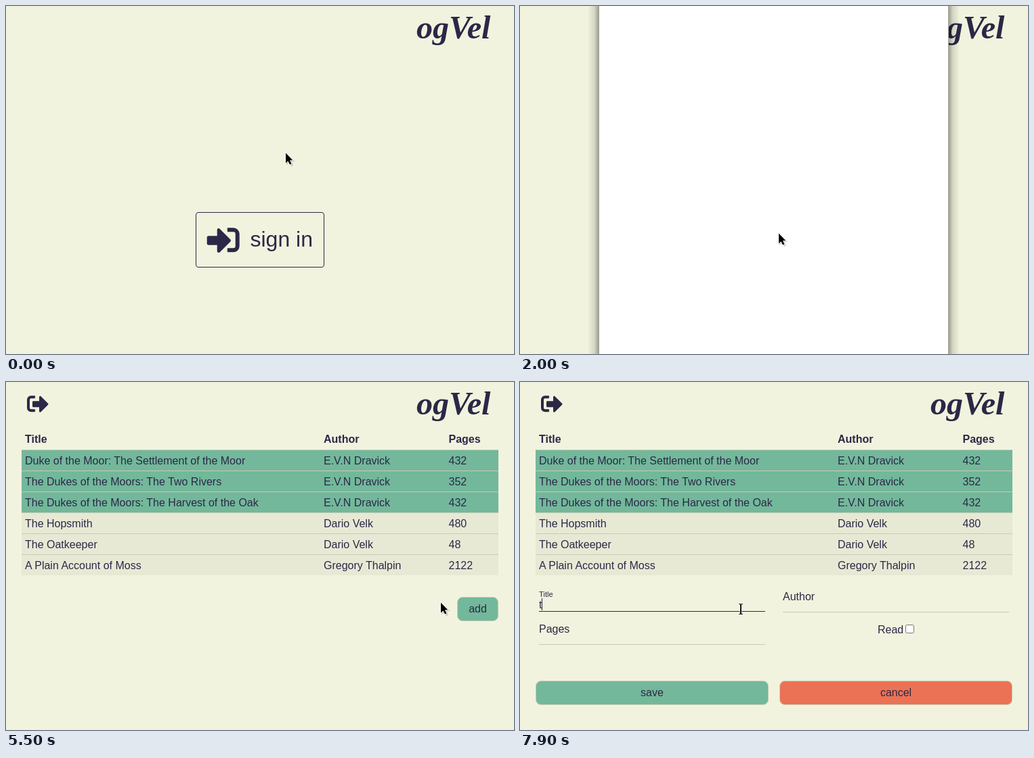
An HTML page for the animation above (8 s loop, 750 by 515 pixels).

```html
<!DOCTYPE html>
<html lang="en">
<head>
<meta charset="utf-8">
<title>Book list</title>
<style>
  html, body { margin: 0; width: 100%; height: 100%; overflow: hidden; background: #f2f3de; }
  svg { display: block; width: 750px; height: 515px; }
  text { font: 16px "Liberation Sans", Arial, sans-serif; fill: #2b2847; white-space: pre; }
  .head { font-weight: bold; }
  .brand { font: italic bold 48px "Liberation Serif", serif; }
  .mid { text-anchor: middle; }
</style>
</head>
<body>
<svg id="stage" viewBox="0 0 750 515">
  <defs>
    <linearGradient id="shade">
      <stop offset="0" stop-opacity="0"/>
      <stop offset=".6" stop-opacity=".13"/>
      <stop offset="1" stop-opacity=".38"/>
    </linearGradient>
    <path id="arrowIcon" fill="#2b2847" d="M369 247L201 79c-15-15-41-4.5-41 17v96H24c-13.3 0-24 10.7-24 24v96c0 13.3 10.7 24 24 24h136v96c0 21.5 26 32 41 17l168-168c9.3-9.4 9.3-24.6 0-34z"/>
    <g id="bracket" fill="none" stroke="#2b2847" stroke-width="64">
      <path d="M326 96h90a64 64 0 0 1 64 64v192a64 64 0 0 1-64 64h-90"/>
      <path stroke-width="12" stroke-linejoin="round" d="M326 70v52M326 390v52"/>
    </g>
  </defs>

  <rect width="750" height="515" fill="#f2f3de"/>
  <text class="brand" x="606" y="48">ogVel</text>

  <g id="signIn">
    <rect id="signInBox" x="280.5" y="305.5" width="189" height="81" rx="3.5" stroke="#2b2847"/>
    <g transform="translate(296.7 322.3) scale(.09375)">
      <use href="#arrowIcon"/><use href="#bracket"/>
    </g>
    <text x="360.5" y="356" style="font-size:32px">sign in</text>
  </g>

  <g id="popup">
    <rect x="100" width="17" height="515" fill="url(#shade)"/>
    <rect width="17" height="515" fill="url(#shade)" transform="translate(649 0) scale(-1 1)"/>
    <rect x="116" width="517" height="515" fill="#a3a398"/>
    <rect x="117" width="515" height="515" fill="#fff"/>
  </g>

  <g id="signOut" transform="translate(31 16.3) scale(.0625)">
    <use href="#arrowIcon" x="128"/>
    <use href="#bracket" transform="translate(512) scale(-1 1)"/>
  </g>

  <g id="table"></g>

  <g id="add">
    <rect id="addBox" x="666.5" y="318.5" width="60" height="35" rx="7.5" stroke="#c8cab6"/>
    <text class="mid" x="696.5" y="341">add</text>
  </g>

  <g id="form">
    <text id="titleLabel" x="28">Title</text>
    <text id="typed" x="28" y="335"></text>
    <rect id="titleLine" x="28" width="334" height="1"/>
    <rect id="caret" y="320" width="1" height="18" fill="#2b2847"/>
    <text x="388" y="323">Author</text>
    <rect x="388" y="340" width="334" height="1" fill="#c8cab6"/>
    <text x="28" y="371">Pages</text>
    <rect x="28" y="388" width="334" height="1" fill="#c8cab6"/>
    <text x="528" y="372">Read</text>
    <rect x="569.5" y="359.5" width="12" height="12" rx="2" fill="#fff" stroke="#767676"/>
    <rect x="23.5" y="442.5" width="343" height="35" rx="7.5" fill="#73b89b" stroke="#c8cab6"/>
    <text class="mid" x="195" y="465">save</text>
    <rect x="383.5" y="442.5" width="343" height="35" rx="7.5" fill="#ec7255" stroke="#c8cab6"/>
    <text class="mid" x="555" y="465">cancel</text>
  </g>

  <g id="cursor">
    <g id="pointer">
      <path d="M1 2v16l4-3 3 5 3-1-2-6h5z" opacity=".18"/>
      <path d="M0 .5V15.5L3.4 12.4 6 17.6 8.4 16.5 6 11.2H10.3Z" stroke="#fff" stroke-width="1.4" paint-order="stroke"/>
    </g>
    <g id="hand">
      <path d="M-1.5-1.5Q0-2.8 1.3-1.5V3.2Q3 2 4 3.5 5.8 2.6 6.6 4.2 8.7 4 8.7 6V10.5L7 15.5H0L-3.8 9.5Q-3.8 6.5-1.5 8Z" stroke="#fff" stroke-width="1.6" paint-order="stroke"/>
      <path d="M1.7 10.5v3M3.8 10.5v3M5.9 10.5v3" stroke="#ddd" stroke-width=".7"/>
    </g>
    <g id="beam" fill="none">
      <path d="M-3.5-7.5H3.5M0-7.5V7.5M-3.5 7.5H3.5" stroke="#fff" stroke-width="3"/>
      <path d="M-3-7.5H-.5V7.5M-3 7.5H3M3-7.5H.5V7.5" stroke="#111"/>
    </g>
  </g>
</svg>
<script>
const LOOP = 8000;
const el = id => document.getElementById(id);
const show = (id, on) => { el(id).style.display = on ? "" : "none"; };
const set = (id, attrs) => {
  for (const name in attrs) el(id).setAttribute(name, attrs[name]);
};

const books = [
  ["Duke of the Moor: The Settlement of the Moor", "E.V.N Dravick", 432, true],
  ["The Dukes of the Moors: The Two Rivers", "E.V.N Dravick", 352, true],
  ["The Dukes of the Moors: The Harvest of the Oak", "E.V.N Dravick", 432, true],
  ["The Hopsmith", "Dario Velk", 480, false],
  ["The Oatkeeper", "Dario Velk", 48, false],
  ["A Plain Account of Moss", "Gregory Thalpin", 2122, false],
];

const cells = (values, y, cls = "") => values.map((value, i) =>
  `<text class="${cls}" x="${[28, 469, 653.5][i]}" y="${y}">${value}</text>`).join("");

el("table").innerHTML = cells(["Title", "Author", "Pages"], 90, "head") +
  books.map(([title, author, pages, read], i) => {
    const y = 100 + 31 * i;
    return `<rect x="23" y="${y}" width="704" height="31" fill="${read ? "#73b89b" : "#e8e9d5"}"/>
      <rect x="23" y="${y}" width="704" height="1" fill="#c8cab6"/>` +
      cells([title, author, pages], y + 22);
  }).join("");

// Each entry holds from its start time until the next: [start, x, y, shape]
const cursorStops = [
  [0, 413, 217, "pointer"], [100, 405, 250, "pointer"], [200, 388, 318, "hand"],
  [300, 382, 336, "hand"], [2000, 382, 336, "pointer"],
  [5000, 430, 325, "pointer"], [5100, 510, 310, "pointer"], [5200, 575, 316, "pointer"],
  [5500, 642, 326, "pointer"], [5600, 681, 343, "hand"], [6000, 681, 343, "pointer"],
  [6200, 545, 325, "beam"], [6300, 400, 323, "beam"], [6400, 326, 336, "beam"],
];
const typing = [[0, "", 28], [7200, "t", 32], [7600, "th", 41], [7900, "t", 32]];
const current = (stops, t) => stops.findLast(stop => stop[0] <= t);

function draw(t) {
  const listed = t >= 4200, editing = t >= 6000, focused = t >= 6700;
  show("signIn", t < 2000);
  show("popup", t >= 2000 && t < 4100);
  show("signOut", t >= 4100);
  show("table", listed);
  show("add", listed && !editing);
  show("form", editing);
  set("signInBox", { fill: t >= 200 ? "#cacbb6" : "#f2f3de" });
  set("addBox", { fill: t >= 5600 ? "#63a488" : "#73b89b" });

  el("titleLabel").style.fontSize = focused ? "11.2px" : "16px";
  set("titleLabel", { y: focused ? 318 : 323 });
  set("titleLine", { y: focused ? 339 : 340, fill: focused ? "#2b2847" : "#c8cab6" });
  const [, text, caretX] = current(typing, t);
  el("typed").textContent = text;
  set("caret", { x: caretX });
  show("caret", focused);

  const [, x, y, shape] = current(cursorStops, t);
  set("cursor", { transform: `translate(${x} ${y})` });
  for (const name of ["pointer", "hand", "beam"]) show(name, name === shape);
}

const start = performance.now();
function tick() {
  draw((performance.now() - start) % LOOP);
  requestAnimationFrame(tick);
}
tick();
</script>
</body>
</html>
```
